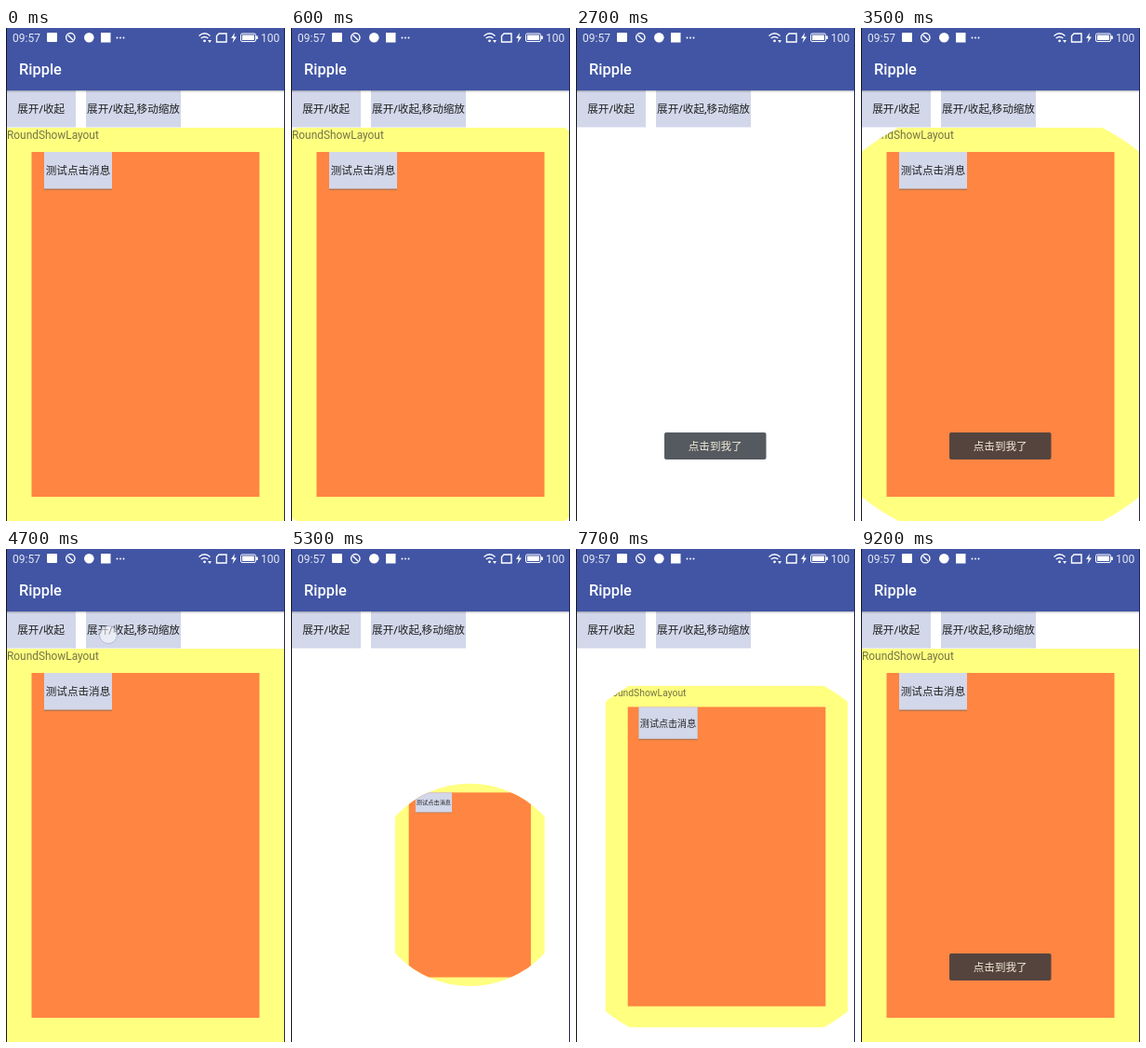
An HTML page that plays this animation: 300x529 px, repeating every 9400 ms.

```html
<!DOCTYPE html>
<html lang="zh-CN">
<head>
<meta charset="utf-8">
<title>Ripple</title>
<style>
html, body { margin: 0; width: 100%; height: 100%; overflow: hidden; background: #fff; }
svg { display: block; width: 300px; height: 529px; }
text { font-family: Roboto, "Noto Sans CJK SC", "Noto Sans CJK", sans-serif; font-size: 11.6px; fill: #222; }
.status { font-size: 12px; fill: #e6e8f2; }
.title { font-size: 16.4px; font-weight: 500; fill: #fff; }
.label { font-size: 11.9px; fill: #757548; }
.caption { font-weight: 500; text-anchor: middle; }
.btn { fill: #d2d7ea; }
.line { fill: none; stroke: #fff; stroke-width: 1.4; }
</style>
</head>
<body>
<svg viewBox="0 0 300 529">
  <defs>
    <clipPath id="reveal"><circle id="hole" cx="150" cy="318" r="260"/></clipPath>
    <linearGradient id="shade" x2="0" y2="1">
      <stop offset="0" stop-color="#000" stop-opacity=".25"/>
      <stop offset="1" stop-color="#000" stop-opacity="0"/>
    </linearGradient>
  </defs>
  <rect width="300" height="529" fill="#fff"/>

  <g id="layout"><g clip-path="url(#reveal)">
    <rect y="107" width="300" height="422" fill="#ffff80"/>
    <text class="label" x="1" y="119.3">RoundShowLayout</text>
    <rect x="27.5" y="133" width="245" height="370" fill="#ff8542"/>
    <rect x="41" y="134" width="73" height="40" fill="#8a6a50" opacity=".6"/>
    <rect class="btn" x="41" y="133" width="73" height="39.5"/>
    <text class="caption" x="77.5" y="157.3">测试点击消息</text>
  </g></g>

  <rect class="btn" x="1" y="67" width="74" height="39.5"/>
  <rect class="btn" x="86" y="67" width="102" height="39.5"/>
  <text class="caption" x="37.7" y="91.2">展开/收起</text>
  <text class="caption" x="137" y="91.2">展开/收起,移动缩放</text>

  <rect width="300" height="67" fill="#4155a4"/>
  <rect y="67" width="300" height="2.5" fill="url(#shade)"/>
  <text class="title" x="14" y="50.3">Ripple</text>

  <text class="status" x="7" y="14.5">09:57</text>
  <rect x="44" y="5" width="11" height="10" rx="1" fill="#fff"/>
  <circle class="line" cx="69.3" cy="10.2" r="4.7"/>
  <path class="line" d="M66.5 7.4l5.6 5.6"/>
  <circle cx="89.3" cy="10.2" r="5.3" fill="#fff"/>
  <rect x="102" y="5" width="10.5" height="10.5" fill="#fff"/>
  <g fill="#fff"><circle cx="119.5" cy="10.5" r="1"/><circle cx="123" cy="10.5" r="1"/><circle cx="126.5" cy="10.5" r="1"/></g>
  <path class="line" d="M207.5 8.5q6-5.4 12 0M209.7 11q3.8-3.2 7.6 0"/>
  <circle cx="213.5" cy="13.8" r="1.4" fill="#fff"/>
  <path d="M217 13h4l-2 3z" fill="#fff"/>
  <path class="line" d="M229 6h8v9h-10.5v-6.5z"/>
  <path d="M246 5l-4 6h2.8l-1.3 5 4.5-6.6h-2.8z" fill="#fff"/>
  <rect class="line" x="252.5" y="6" width="16" height="8.5" rx="1.5" style="stroke-width:1"/>
  <rect x="254" y="7.5" width="13" height="5.5" fill="#fff"/>
  <rect x="269" y="8.5" width="1.8" height="3.5" fill="#fff"/>
  <text class="status" x="274" y="14.5">100</text>

  <g id="toast">
    <rect x="95" y="434" width="109.5" height="29" rx="2" fill="#30363d" fill-opacity=".82"/>
    <text x="149.7" y="452.8" text-anchor="middle" style="fill:#f2ead8">点击到我了</text>
  </g>
  <circle id="touch" r="9.5" fill="#fff" fill-opacity=".55" stroke="#a9aed2" stroke-width=".8"/>
  <rect width="1" height="529" fill="#15151c"/>
  <rect x="299" width="1" height="529" fill="#23235c"/>
</svg>
<script>
const LOOP = 9400, STEP = 100, FULL = 259, SMALL = 150;
const $ = id => document.getElementById(id);
const layout = $('layout'), hole = $('hole'), toast = $('toast'), touch = $('touch');

// from, to, x, y
const taps = [
  [400, 600, 38, 90],
  [1800, 2000, 64, 160],
  [2600, 2700, 38, 90],
  [4600, 4800, 110, 92],
  [6100, 6300, 59, 162],
  [6500, 6700, 64, 161],
  [6800, 7000, 110, 92],
  [8400, 8600, 76, 153]
];

const clamp = v => Math.max(0, Math.min(1, v));
const ramp = (t, from, len) => clamp((t - from) / len);
const ease = (t, from) => (1 - Math.cos(Math.PI * ramp(t, from, 1000))) / 2;
const mix = (a, b, p) => a + (b - a) * p;

function draw(t) {
  // plain circular reveal, then reveal combined with move and scale
  const open = t < 1400 ? 1 - ease(t, 528) : ease(t, 2685);
  const grow = t < 6500 ? 1 - ease(t, 4790) : ease(t, 6950);
  const moving = t >= 4600;
  const p = moving ? grow : 1;
  const r = moving ? mix(SMALL, FULL, p) : FULL * open;
  const x = mix(232, 150, p), y = mix(400.3, 318, p), s = mix(0.1, 1, p);
  hole.setAttribute('r', r);
  layout.setAttribute('transform', `translate(${x} ${y}) scale(${s}) translate(-150 -318)`);

  toast.setAttribute('opacity',
    ramp(t, 1900, 300) - ramp(t, 4000, 300) + ramp(t, 8500, 300));

  const tap = taps.find(([from, to]) => t >= from && t < to);
  touch.setAttribute('opacity', tap ? 1 : 0);
  if (tap) {
    touch.setAttribute('cx', tap[2]);
    touch.setAttribute('cy', tap[3]);
  }
}

function tick() {
  const t = performance.now() % LOOP;
  draw(Math.floor(t / STEP) * STEP);
  requestAnimationFrame(tick);
}
tick();
</script>
</body>
</html>
```
